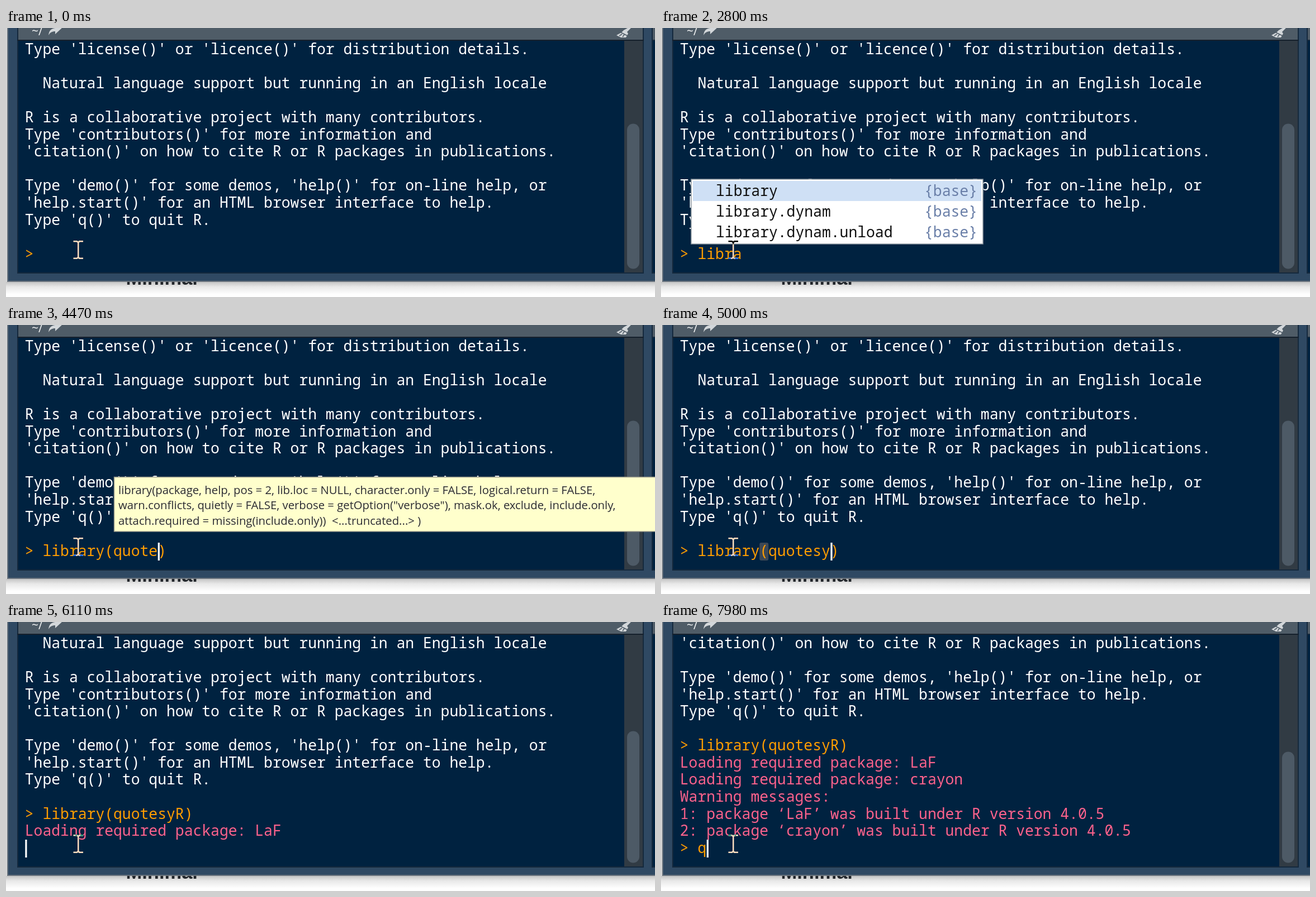
Animation, 1161 px wide and 482 px high, one loop 8000 ms. Source, as an HTML page:

```html
<!DOCTYPE html>
<html lang="en">
<head>
<meta charset="utf-8">
<title>R console</title>
<style>
  html, body { margin: 0; width: 100%; height: 100%; overflow: hidden; background: #fefefe; }
  svg { display: block; width: 1161px; height: 482px; isolation: isolate; }
  text { white-space: pre; }
  .mono text { font: 500 26.38px "Noto Sans Mono", monospace; fill: #fff; }
  .mono .in { fill: #ff9d00; }
  .mono .msg { fill: #ff628c; }
  .ui text { font: 20.3px "Open Sans", sans-serif; fill: #2b2b33; }
  .mono .item { fill: #111; font-weight: 400; }
  .mono .pkg { fill: #6a7fa8; font-weight: 400; text-anchor: end; }
  #mouse { mix-blend-mode: difference; fill: #fff; }
</style>
</head>
<body>
<svg viewBox="0 0 1161 482">
  <defs>
    <linearGradient id="shade" x2="0" y2="1">
      <stop offset="0" stop-color="#c4c4c4"/>
      <stop offset=".4" stop-color="#e8e8e8"/>
      <stop offset="1" stop-color="#fefefe"/>
    </linearGradient>
    <clipPath id="view"><path d="M22 23H1106V438H22Z"/></clipPath>
  </defs>

  <!-- page behind the window -->
  <rect width="1161" height="482" fill="#fefefe"/>
  <rect y="455" width="1161" height="22" fill="url(#shade)"/>
  <rect width="2" height="455" fill="#d8d8d8"/>
  <text x="214.500" y="460" font-family="Liberation Sans, sans-serif" font-weight="700" font-size="34.500" fill="#22262b">Minimal</text>

  <!-- window frame and panes -->
  <rect x="2" width="1159" height="455" fill="#69737d"/>
  <rect x="4" width="1157" height="453" fill="#2f4963"/>
  <rect x="20" width="1121" height="440" fill="#15293d"/>
  <rect x="22" width="1117" height="438" fill="#002240"/>
  <rect x="22" width="1117" height="21" fill="#4f5c67"/>
  <rect x="20" y="21" width="1121" height="2" fill="#15202c"/>
  <rect x="1155" width="6" height="440" fill="#15293d"/>
  <rect x="1157" y="23" width="4" height="415" fill="#002240"/>
  <rect x="1157" width="4" height="21" fill="#4f5c67"/>
  <text x="46" y="13" font-family="Open Sans, sans-serif" font-size="21" fill="#f2f4f5">~/</text>
  <path d="M76 13C77 4 81 1 88 0H100L88 11V6C82 6 79 8 76 13Z" fill="#d3d7da"/>
  <path d="M1118 0H1112L1105 4 1101 8 1092 13 1100 17H1109L1113 10 1111 7Z" fill="#d3d7da"/>
  <path d="M1100 8L1112 14M1097 14L1102 11M1103 16L1106 12" stroke="#4f5c67" stroke-width="1.500"/>
  <rect x="1106" y="23" width="33" height="415" fill="#313b44"/>
  <rect id="thumb" x="1111" width="22" rx="11" fill="#4d5a66"/>

  <g class="mono" clip-path="url(#view)">
    <rect id="pair" y="390" width="16" height="32" rx="3" fill="#3c4856"/>
    <g id="rows"></g>
    <rect id="caret" y="390" width="3.200" height="32" fill="#fff"/>
  </g>

  <g id="tip" class="ui">
    <rect x="193.500" y="272.500" width="980" height="97.500" fill="#ffffcc" stroke="#9a9a8c" stroke-width="1.500"/>
    <text x="201" y="302.500">library(package, help, pos = 2, lib.loc = NULL, character.only = FALSE, logical.return = FALSE,</text>
    <text x="201" y="330">warn.conflicts, quietly = FALSE, verbose = getOption("verbose"), mask.ok, exclude, include.only,</text>
    <text x="201" y="357.500">attach.required = missing(include.only))  &lt;...truncated...&gt; )</text>
  </g>

  <g id="popup" class="mono">
    <rect x="54" y="271" width="522" height="116" fill="#fff" stroke="#8d969e" stroke-width="1.500"/>
    <rect x="57" y="274" width="516" height="36" fill="#cfe0f5"/>
  </g>

  <path id="mouse" d="M120.500 381H127.500L129 382.500 130.500 381H138V383.500H132L130.500 385V410L132 411.500H138V414H130.500L129 412.500 127.500 414H120.500V411.500H126.500L128 410V385L126.500 383.500H120.500Z"/>
</svg>
<script>
const LOOP = 8000, LEFT = 33.8, CHAR = 15.828, BASE = 47, ROW = 30.56;

const lines = [
  "Type 'license()' or 'licence()' for distribution details.",
  "",
  "  Natural language support but running in an English locale",
  "",
  "R is a collaborative project with many contributors.",
  "Type 'contributors()' for more information and",
  "'citation()' on how to cite R or R packages in publications.",
  "",
  "Type 'demo()' for some demos, 'help()' for on-line help, or",
  "'help.start()' for an HTML browser interface to help.",
  "Type 'q()' to quit R.",
  "",
  "> library(quotesyR)",
  "Loading required package: LaF",
  "Loading required package: crayon",
  "Warning messages:",
  "1: package ‘LaF’ was built under R version 4.0.5",
  "2: package ‘crayon’ was built under R version 4.0.5"
];
const COMMAND = 12;

// [time, input ("|" marks the caret), parts shown, lines printed, first visible line]
// parts: c caret, t signature tip, p completion list, m pair of "(", o pair of ")"
const steps = [
  [0, "> |", "", 12, 0],
  [130, "> |", "c", 12, 0],
  [690, "> |", "", 12, 0],
  [1100, "> l|", "c", 12, 0],
  [1250, "> li|", "c", 12, 0],
  [1810, "> li|", "", 12, 0],
  [1960, "> libr|", "c", 12, 0],
  [2090, "> libra|", "c", 12, 0],
  [2520, "> libra|", "cp", 12, 0],
  [2800, "> libra|", "p", 12, 0],
  [3080, "> library(|)", "ctm", 12, 0],
  [3760, "> library(|)", "tm", 12, 0],
  [3890, "> library(q|)", "ct", 12, 0],
  [4050, "> library(qu|)", "ct", 12, 0],
  [4200, "> library(quo|)", "ct", 12, 0],
  [4320, "> library(quot|)", "ct", 12, 0],
  [4470, "> library(quote|)", "ct", 12, 0],
  [4870, "> library(quotes|)", "ct", 12, 0],
  [5000, "> library(quotesy|)", "co", 12, 0],
  [5400, "> library(quotesyR|)", "ct", 12, 0],
  [5990, "|", "c", 13, 1],
  [6110, "|", "c", 14, 2],
  [6700, "|", "", 15, 2],
  [6990, "> |", "c", 18, 6],
  [7550, "> |", "", 18, 6],
  [7980, "> q|", "c", 18, 6]
];

const el = id => document.getElementById(id);
const show = (id, on) => el(id).style.display = on ? "" : "none";

function addText(parent, str, x, y, cls) {
  const t = document.createElementNS("http://www.w3.org/2000/svg", "text");
  t.setAttribute("x", x);
  t.setAttribute("y", y);
  t.setAttribute("class", cls);
  t.textContent = str;
  parent.append(t);
}

["library", "library.dynam", "library.dynam.unload"].forEach((name, i) => {
  const y = 301 + i * 37;
  addText(el("popup"), name, 98, y, "item");
  addText(el("popup"), "{base}", 566, y, "pkg");
});

function draw([, input, parts, count, top]) {
  const rows = el("rows");
  rows.replaceChildren();
  const addRow = (str, line, cls) => addText(rows, str, LEFT, BASE + (line - top) * ROW, cls);
  lines.slice(0, count).forEach((str, i) => {
    if (str && i >= top) addRow(str, i, i < COMMAND ? "" : i === COMMAND ? "in" : "msg");
  });
  addRow(input.replace("|", ""), count, "in");

  const column = input.indexOf("|");
  el("caret").setAttribute("x", LEFT + column * CHAR + 0.5);
  el("pair").setAttribute("x", LEFT + (parts.includes("o") ? 9 : column) * CHAR);
  show("caret", parts.includes("c"));
  show("pair", /[mo]/.test(parts));
  show("tip", parts.includes("t"));
  show("popup", parts.includes("p"));

  // thumb size and place follow the length of the log
  const height = 5089 / (count + 7.57);
  const hidden = count - 12 - top;
  const bottom = 431.5 - hidden * 409 / (count + 7.57);
  el("thumb").setAttribute("y", bottom - height);
  el("thumb").setAttribute("height", height);
}

const start = performance.now();
let current;
function frame() {
  const t = (performance.now() - start) % LOOP;
  const step = steps.findLast(s => s[0] <= t);
  if (step !== current) draw(current = step);
  requestAnimationFrame(frame);
}
frame();
</script>
</body>
</html>
```
